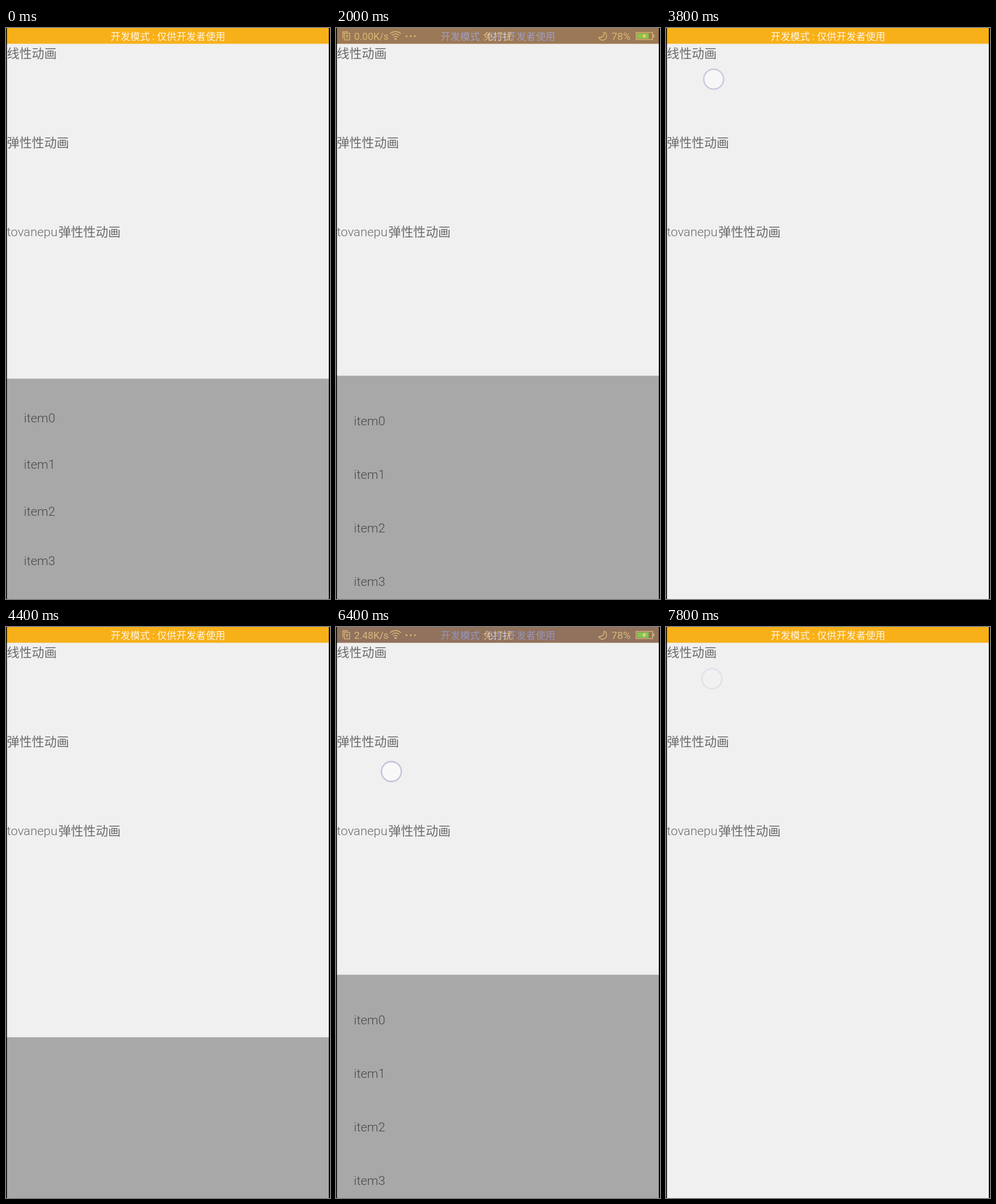
Write an HTML page with a canvas that moves like this. It is 544 by 960 pixels and loops after 8000 ms.

```html
<!DOCTYPE html>
<html lang="zh">
<head>
<meta charset="utf-8">
<title>动画面板</title>
<style>
html, body { margin: 0; width: 100%; height: 100%; overflow: hidden; background: #000; }
canvas { display: block; width: 544px; height: 960px; }
</style>
</head>
<body>
<canvas id="stage" width="544" height="960"></canvas>
<script>
const W = 544, H = 960, LOOP = 8000;
const LEFT = 1.5, RIGHT = 542, BAR = 26.6;
const SHEET = 375.4, REST = H - SHEET;
const FONT = 'Roboto, "Noto Sans CJK SC", "Noto Sans CJK", sans-serif';
const INK = 'rgb(187,192,217)';

const ctx = document.getElementById('stage').getContext('2d');
const statusCanvas = document.createElement('canvas');
statusCanvas.width = W;
statusCanvas.height = 27;
const sctx = statusCanvas.getContext('2d');

const clamp = v => Math.max(0, Math.min(1, v));
const ramp = (t, start, length) => clamp((t - start) / length);

function backOut(p) {
  const c = 1.70158, q = p - 1;
  return 1 + (c + 1) * q * q * q + c * q * q;
}

function text(c, str, x, y, size, color, weight = 400, align = 'left') {
  c.font = `${weight} ${size}px ${FONT}`;
  c.textAlign = align;
  c.fillStyle = color;
  c.fillText(str, x, y);
}

// The sheet is open twice; rows begin to rise at `rows`.
const SLIDE = 425;
const visits = [
  { open: -1147, rows: -722, close: 2775, settle: 5 },
  { open: 4095, rows: 4520, close: 6550, settle: 0 }
];

const taps = [
  { x: 95, y: 321, start: 2350, end: 2700 },
  { x: 80, y: 86, start: 3750, end: 4080 },
  { x: 93, y: 243, start: 6250, end: 6560 },
  { x: 77, y: 87, start: 7540, end: 7850 }
];

function drawTitles() {
  const color = '#6a6a6a';
  text(ctx, '线性动画', LEFT, 49.5, 20.9, color);
  text(ctx, '弹性性动画', LEFT, 199.5, 20.9, color);
  text(ctx, 'tovanepu', LEFT, 349.5, 21, color, 300);
  text(ctx, '弹性性动画', 88, 349.5, 20.9, color);
}

function drawSheet(t) {
  for (const v of visits) {
    if (t < v.open || t > v.close + SLIDE) continue;
    const down = SHEET * ramp(t, v.close, SLIDE);
    const rise = SHEET * (1 - ramp(t, v.open, SLIDE));
    const top = REST + down + rise + v.settle * Math.exp(-t / 150);
    ctx.fillStyle = '#a8a8a8';
    ctx.fillRect(0, top, W, H - top);
    for (let i = 0; i < 4; i++) {
      const p = ramp(t, v.rows, 800 + 100 * i);
      const y = REST + 83 + 90 * i + down + SHEET * (1 - backOut(p));
      text(ctx, 'item' + i, 30, y, 21, '#484848', 300);
    }
  }
}

function drawTap(t) {
  for (const { x, y, start, end } of taps) {
    const a = Math.min(ramp(t, start, 60), 1 - ramp(t, end - 140, 140));
    if (a <= 0) continue;
    ctx.beginPath();
    ctx.arc(x, y, 16.7, 0, 7);
    ctx.fillStyle = `rgba(255,255,255,${0.6 * a * a})`;
    ctx.fill();
    ctx.lineWidth = 2.4;
    ctx.strokeStyle = `rgba(198,194,222,${a})`;
    ctx.stroke();
  }
}

function drawWifi(c) {
  for (const r of [5, 9, 13]) {
    c.beginPath();
    c.arc(100, 19, r, -Math.PI * 0.75, -Math.PI * 0.25);
    c.stroke();
  }
  c.beginPath();
  c.arc(100, 18.5, 1.7, 0, 7);
  c.fill();
}

function drawMoon(c) {
  c.beginPath();
  c.arc(447.5, 13.5, 7, -1.2, 2.75);
  c.quadraticCurveTo(451, 16, 450, 7);
  c.stroke();
}

function drawBattery(c) {
  c.strokeRect(504, 7.5, 27.5, 12);
  c.fillRect(532.5, 11, 1.8, 5);
  c.fillStyle = '#10dc80';
  c.fillRect(505.5, 9, 19.5, 9);
  c.fillStyle = '#e8edf5';
  c.beginPath();
  c.moveTo(519, 8.5);
  c.lineTo(513.5, 14.2);
  c.lineTo(517, 14.2);
  c.lineTo(516, 18.5);
  c.lineTo(521.5, 12.6);
  c.lineTo(518, 12.6);
  c.fill();
}

function drawStatus(c, rate) {
  c.fillStyle = '#303a9f';
  c.fillRect(0, 0, W, 27);
  c.strokeStyle = c.fillStyle = INK;
  c.lineWidth = 1.3;
  c.strokeRect(14, 9, 9, 11);
  c.beginPath();
  c.moveTo(11.5, 17.5);
  c.lineTo(11.5, 6.5);
  c.lineTo(20, 6.5);
  c.moveTo(18.5, 12);
  c.lineTo(18.5, 17.5);
  c.moveTo(16.7, 13);
  c.lineTo(20.3, 13);
  c.stroke();
  text(c, rate, 30.5, 20, 16.5, INK);
  drawWifi(c);
  for (const x of [118.5, 125.5, 132.5]) c.fillRect(x - 1.3, 12.5, 2.6, 2.6);
  text(c, '免打扰', 272, 19.5, 16.3, INK, 400, 'center');
  drawMoon(c);
  text(c, '78%', 462.5, 20, 17.3, INK);
  drawBattery(c);
}

// The banner periodically fades to the system status row and back.
function statusAlpha(t) {
  const period = 4440;
  const u = (t - 4690 + 2 * period) % period;
  return Math.min(ramp(u, 0, 800), 1 - ramp(u, 1322, 800));
}

function drawBar(t) {
  ctx.save();
  ctx.beginPath();
  ctx.rect(0, 0, W, BAR);
  ctx.clip();
  ctx.fillStyle = '#f8b019';
  ctx.fillRect(0, 0, W, 27);
  text(ctx, '开发模式 : 仅供开发者使用', 272, 19.7, 16.4, '#fff6e4', 400, 'center');
  const a = statusAlpha(t);
  if (a > 0) {
    drawStatus(sctx, t < 3500 ? '0.00K/s' : '2.48K/s');
    ctx.globalAlpha = a;
    ctx.drawImage(statusCanvas, 0, 0);
  }
  ctx.restore();
}

function drawEdges() {
  ctx.fillStyle = '#000';
  ctx.fillRect(0, 0, LEFT, H);
  ctx.fillRect(RIGHT, 0, W - RIGHT, H);
}

function draw(t) {
  ctx.fillStyle = '#f0f0f0';
  ctx.fillRect(0, 0, W, H);
  drawTitles();
  drawSheet(t);
  drawBar(t);
  drawTap(t);
  drawEdges();
}

const begin = performance.now();
function tick() {
  draw((performance.now() - begin) % LOOP);
  requestAnimationFrame(tick);
}
tick();
</script>
</body>
</html>
```
